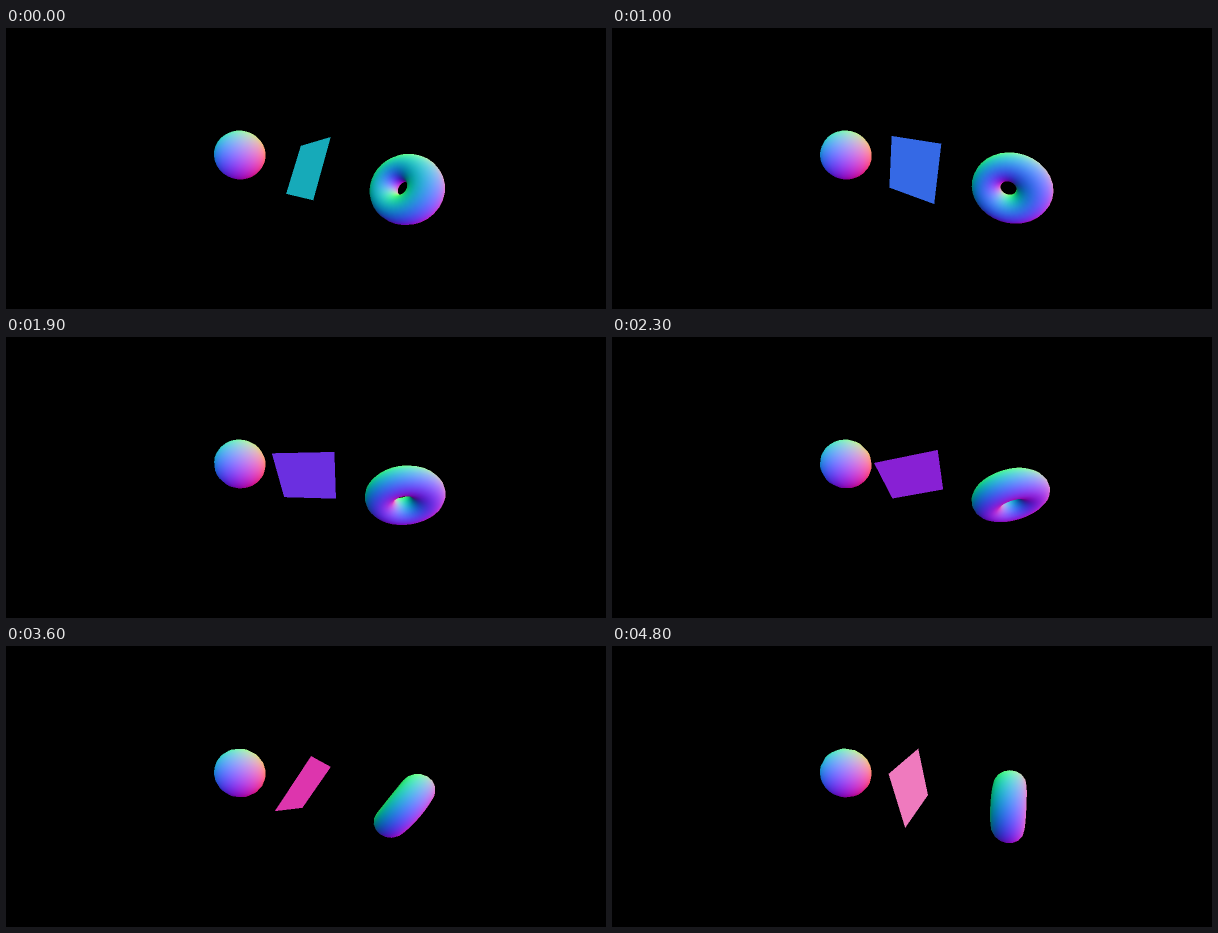
Write an HTML page with a canvas that moves like this. It is 600 by 281 pixels and loops after 4.9 s.

```html
<!DOCTYPE html>
<html lang="en">
<head>
<meta charset="utf-8">
<title>Normal-shaded solids</title>
<style>
  html, body { margin: 0; width: 100%; height: 100%; overflow: hidden; background: #000; }
  canvas { display: block; width: 600px; height: 281px; }
</style>
</head>
<body>
<canvas id="stage"></canvas>
<script>
const W = 600, H = 281, SCALE = 2;
const LOOP = 4900, STEP = 100;
const START_ANGLE = -0.667, SPIN = 0.5; // radians, radians per second

const canvas = document.getElementById('stage');
const w = canvas.width = W * SCALE;
const h = canvas.height = H * SCALE;
const ctx = canvas.getContext('2d');
const image = ctx.createImageData(w, h);
const pixels = new Uint32Array(image.data.buffer);
const depth = new Float32Array(w * h);

// Camera on the (1, 1, 2) diagonal, looking at the origin, 75 degree field of view
const DISTANCE = 3.165;
const FOCAL = h / 2 / Math.tan(37.5 * Math.PI / 180);
const r5 = Math.sqrt(5), r6 = Math.sqrt(6), r30 = Math.sqrt(30);
const RIGHT = [2 / r5, 0, -1 / r5];
const UP = [-1 / r30, 5 / r30, -2 / r30];
const BACK = [1 / r6, 1 / r6, 2 / r6];

const dot = (a, b) => a[0] * b[0] + a[1] * b[1] + a[2] * b[2];
const toView = p => [dot(RIGHT, p), dot(UP, p), dot(BACK, p)];

// Turn about y, then about x, by the same angle
function spin([x, y, z], c, s) {
  const x1 = x * c + z * s, z1 = z * c - x * s;
  return [x1, y * c - z1 * s, y * s + z1 * c];
}

function mesh(x, cols, rows, surface) {
  const points = [], triangles = [];
  for (let j = 0; j <= rows; j++)
    for (let i = 0; i <= cols; i++) points.push(surface(i / cols, j / rows));
  for (let j = 0; j < rows; j++)
    for (let i = 0; i < cols; i++) {
      const a = j * (cols + 1) + i, b = a + cols + 1;
      triangles.push([a, b, b + 1], [a, b + 1, a + 1]);
    }
  return { x, points, triangles };
}

const TAU = Math.PI * 2;

function sphere(u, v) {
  const s = Math.sin(v * Math.PI);
  const n = [-Math.cos(u * TAU) * s, Math.cos(v * Math.PI), Math.sin(u * TAU) * s];
  return { p: n.map(k => k * 0.5), n };
}

function plane(u, v) {
  return { p: [u - 0.5, 0.5 - v, 0], n: [0, 0, 1] };
}

function torus(u, v) {
  const cu = Math.cos(u * TAU), su = Math.sin(u * TAU);
  const cv = Math.cos(v * TAU), sv = Math.sin(v * TAU);
  const r = 0.3 + 0.2 * cv;
  return { p: [r * cu, r * su, 0.2 * sv], n: [cv * cu, cv * su, sv] };
}

const meshes = [
  mesh(-1.5, 16, 16, sphere),
  mesh(0, 1, 1, plane),
  mesh(1.5, 32, 16, torus)
];

function project({ p, n }, offset, c, s) {
  const q = spin(p, c, s);
  q[0] += offset;
  const [x, y, z] = toView(q);
  const inv = 1 / (DISTANCE - z);
  return {
    x: w / 2 + x * FOCAL * inv,
    y: h / 2 - y * FOCAL * inv,
    inv,
    n: toView(spin(n, c, s))
  };
}

const channel = k => Math.round((k * 0.5 + 0.5) * 255);

function shade(a, b, c, wa, wb, wc) {
  const mix = k => a.n[k] * wa + b.n[k] * wb + c.n[k] * wc;
  const x = mix(0), y = mix(1), z = mix(2);
  const len = Math.hypot(x, y, z) || 1;
  return 0xff000000 | channel(z / len) << 16 | channel(y / len) << 8 | channel(x / len);
}

function fill(a, b, c) {
  const area = (b.x - a.x) * (c.y - a.y) - (c.x - a.x) * (b.y - a.y);
  if (Math.abs(area) < 1e-6) return;
  const x0 = Math.floor(Math.min(a.x, b.x, c.x)), x1 = Math.ceil(Math.max(a.x, b.x, c.x));
  const y0 = Math.floor(Math.min(a.y, b.y, c.y)), y1 = Math.ceil(Math.max(a.y, b.y, c.y));
  for (let y = y0; y < y1; y++)
    for (let x = x0; x < x1; x++) {
      const px = x + 0.5, py = y + 0.5;
      const wb = ((px - a.x) * (c.y - a.y) - (c.x - a.x) * (py - a.y)) / area;
      const wc = ((b.x - a.x) * (py - a.y) - (px - a.x) * (b.y - a.y)) / area;
      const wa = 1 - wb - wc;
      if (wa < 0 || wb < 0 || wc < 0) continue;
      const inv = a.inv * wa + b.inv * wb + c.inv * wc;
      const at = y * w + x;
      if (inv <= depth[at]) continue;
      depth[at] = inv;
      pixels[at] = shade(a, b, c, wa, wb, wc);
    }
}

function draw(angle) {
  const c = Math.cos(angle), s = Math.sin(angle);
  pixels.fill(0xff000000);
  depth.fill(0);
  for (const { x, points, triangles } of meshes) {
    const seen = points.map(point => project(point, x, c, s));
    for (const [i, j, k] of triangles) fill(seen[i], seen[j], seen[k]);
  }
  ctx.putImageData(image, 0, 0);
}

const start = performance.now();
let shown = -1;

function tick() {
  const step = Math.floor((performance.now() - start) % LOOP / STEP);
  if (step !== shown) {
    shown = step;
    draw(START_ANGLE + SPIN * step * STEP / 1000);
  }
  requestAnimationFrame(tick);
}
tick();
</script>
</body>
</html>
```
